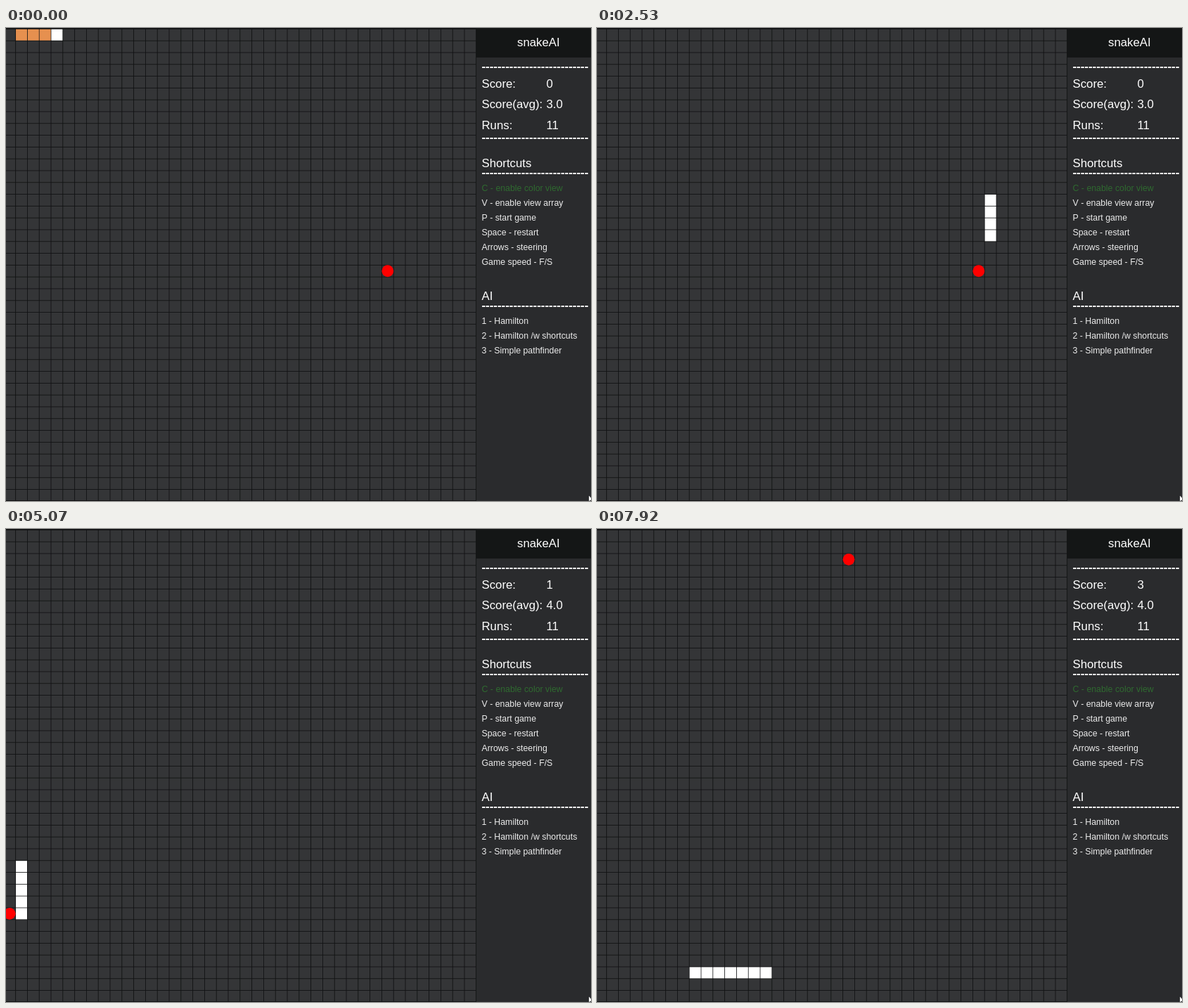
Animation of 832 by 673 pixels, one loop 8000 ms. Source, as an HTML page with a canvas:

```html
<!DOCTYPE html>
<html lang="en">
<head>
<meta charset="utf-8">
<title>snakeAI</title>
<style>
  html, body { margin: 0; width: 100%; height: 100%; overflow: hidden; background: #2a2b2d; }
  canvas { display: block; }
</style>
</head>
<body>
<canvas id="stage" width="832" height="673"></canvas>
<script>
const ctx = document.getElementById('stage').getContext('2d');
const W = 832, H = 673, BOARD_W = 669;
const LOOP = 8000, TICK = LOOP / 104, SPEED = 1.44; // speed in cells per tick
const CELLS = 40, CELL = 20, SCALE = 0.84;
const LINE = '#101112';

// Corners of the snake's route and the food, in cells
const CORNERS = [[1, 0], [33, 0], [33, 20], [1, 20], [1, 34], [0, 34], [0, 17], [2, 17], [2, 37], [14, 37]];
const FOODS = [[32, 20], [0, 32], [4, 37], [21, 2]];

function buildRoute() {
  const cells = [CORNERS[0]];
  for (const [cx, cy] of CORNERS.slice(1)) {
    let [x, y] = cells[cells.length - 1];
    while (x !== cx || y !== cy) {
      x += Math.sign(cx - x);
      y += Math.sign(cy - y);
      cells.push([x, y]);
    }
  }
  return cells;
}

const route = buildRoute();
const meals = FOODS.slice(0, -1).map(([x, y]) => route.findIndex(c => c[0] === x && c[1] === y));

// The game runs evenly except for a short stall after its sixth tick.
function headIndex(time) {
  const tick = Math.floor((time + 12) / TICK);
  const played = Math.min(tick, 6) + Math.max(0, tick - 7.25);
  return Math.min(route.length - 1, 3 + Math.round(played * SPEED));
}

function rect(color, x, y, w, h) {
  ctx.fillStyle = color;
  ctx.fillRect(x, y, w, h);
}

function drawGrid() {
  rect('#343537', -CELL, -CELL, CELL * (CELLS + 1), CELL * (CELLS + 2));
  for (let i = 0; i <= CELLS; i++) {
    rect(LINE, i * CELL, -CELL, 1, CELL * (CELLS + 2));
    rect(LINE, -CELL, i * CELL, CELL * (CELLS + 1), 1);
  }
}

function drawFood([c, r]) {
  ctx.fillStyle = '#f00';
  ctx.beginPath();
  ctx.arc((c + 0.5) * CELL + 0.5, (r + 0.5) * CELL + 0.5, CELL / 2, 0, Math.PI * 2);
  ctx.fill();
}

function drawSnake(head, score) {
  const onBorder = route[head].includes(0);
  for (let i = head - 3 - score; i <= head; i++) {
    const [c, r] = route[i];
    const color = onBorder && i < head ? '#e6904f' : '#fff';
    rect(color, c * CELL + 1, r * CELL + 1, CELL - 1, CELL - 1);
  }
}

function drawBoard(head, score) {
  ctx.setTransform(SCALE, 0, 0, SCALE, -3.6, 0.95);
  drawGrid();
  drawFood(FOODS[score]);
  drawSnake(head, score);
  ctx.resetTransform();
  rect(LINE, 0, 0, BOARD_W, 1);
  rect(LINE, 0, H - 1, BOARD_W, 1);
}

function text(str, x, y, font, color = '#fff') {
  ctx.font = font + ' "Liberation Sans", Arial, sans-serif';
  ctx.fillStyle = color;
  ctx.fillText(str, x, y);
}

const large = (str, x, y) => text(str, x, y, '16.8px');
const small = (str, y, color = '#ececec') => text(str, 676.5, y, '12.35px', color);
const rule = y => text('-'.repeat(27), 676.5, y, 'bold 16.9px');

function drawPanel(score) {
  rect('#2a2b2d', BOARD_W, 0, W - BOARD_W, H);
  rect('#141616', BOARD_W, 0, W - BOARD_W, 42);
  large('snakeAI', 727, 26);
  [60, 161, 211, 400].forEach(rule);

  const stats = [['Score:', score], ['Score(avg):', score ? '4.0' : '3.0'], ['Runs:', 11]];
  stats.forEach(([label, value], i) => {
    const y = Math.round(85 + i * 29.4);
    large(label, 676.5, y);
    large(String(value), 768.5, y);
  });

  large('Shortcuts', 676.5, 198);
  const keys = ['C - enable color view', 'V - enable view array', 'P - start game',
    'Space - restart', 'Arrows - steering', 'Game speed - F/S'];
  keys.forEach((s, i) => small(s, 232 + i * 21, i ? undefined : '#2f6a30'));

  large('AI', 676.5, 387);
  ['1 - Hamilton', '2 - Hamilton /w shortcuts', '3 - Simple pathfinder']
    .forEach((s, i) => small(s, 421 + i * 21));
}

function drawPointer() {
  ctx.fillStyle = '#fff';
  ctx.beginPath();
  ctx.moveTo(829, 665.5);
  ctx.lineTo(W, 668.5);
  ctx.lineTo(W, 671.5);
  ctx.lineTo(829, H);
  ctx.fill();
}

function draw(time) {
  const head = headIndex(time);
  const score = meals.filter(i => head >= i).length;
  drawBoard(head, score);
  drawPanel(score);
  drawPointer();
}

const begin = performance.now();
function loop() {
  draw((performance.now() - begin) % LOOP);
  requestAnimationFrame(loop);
}
loop();
</script>
</body>
</html>
```
